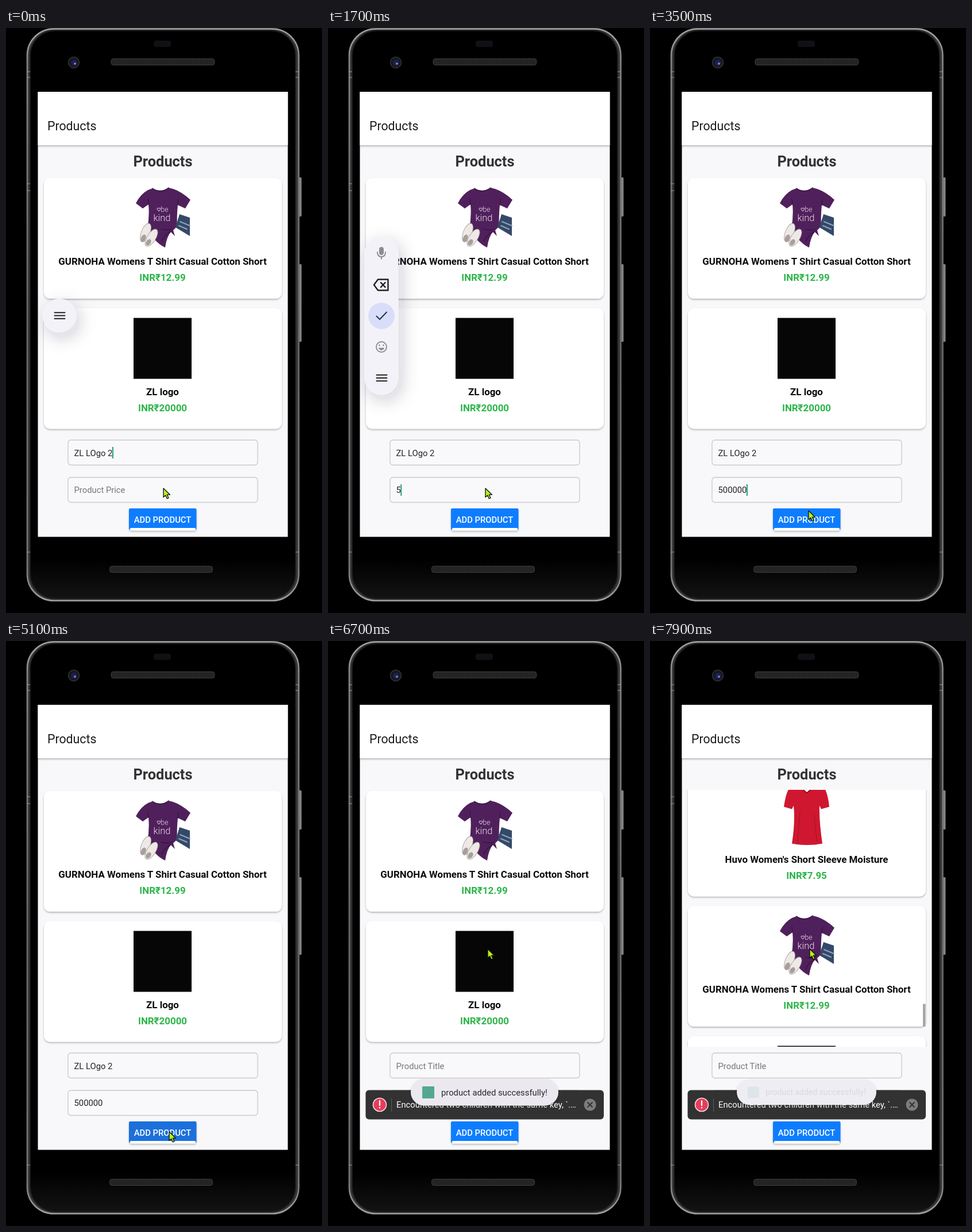
These frames come from a looping animation (550x1018 px, 8000 ms). An HTML page:

```html
<!DOCTYPE html>
<html lang="en">
<head>
<meta charset="utf-8">
<title>Products</title>
<style>
  html, body { margin: 0; width: 100%; height: 100%; overflow: hidden; background: #000; }
  svg { display: block; width: 100%; height: 100%; }
  text { font-family: Roboto, sans-serif; font-size: 14.8px; white-space: pre; }
  .mid { text-anchor: middle; }
  .name { font-size: 16.92px; font-weight: 700; fill: #0b0b0b; }
  .price { font-size: 16.92px; font-weight: 700; fill: #2db54a; }
  .line { fill: none; stroke-linecap: round; stroke-linejoin: round; }
</style>
</head>
<body>
<svg viewBox="0 0 550 1018">
  <defs>
    <linearGradient id="rim" x2="0" y2="1">
      <stop offset="0" stop-color="#a5a5a5"/><stop offset=".06" stop-color="#858585"/>
      <stop offset=".5" stop-color="#686868"/><stop offset=".94" stop-color="#777"/>
      <stop offset="1" stop-color="#a0a0a0"/>
    </linearGradient>
    <linearGradient id="key">
      <stop offset="0" stop-color="#444"/><stop offset=".6" stop-color="#8c8c8c"/><stop offset="1" stop-color="#777"/>
    </linearGradient>
    <linearGradient id="chin" x2="0" y2="1">
      <stop offset=".93" stop-color="#000"/><stop offset="1" stop-color="#131313"/>
    </linearGradient>
    <pattern id="mesh" width="3" height="3" patternUnits="userSpaceOnUse">
      <rect width="3" height="3" fill="#1c1c1c"/><rect width="1.5" height="3" fill="#2b2b2b"/>
    </pattern>
    <filter id="soft" x="-10%" y="-10%" width="120%" height="130%">
      <feDropShadow dx="0" dy="1.8" stdDeviation="1.6" flood-opacity=".28"/>
    </filter>
    <filter id="float" x="-120%" y="-80%" width="360%" height="280%">
      <feDropShadow dx="5" dy="9" stdDeviation="15" flood-color="#223" flood-opacity=".22"/>
    </filter>
    <clipPath id="listClip"><rect x="56" y="259" width="434" height="447"/></clipPath>
    <clipPath id="screenClip"><rect x="55.500" y="111" width="435" height="774.500"/></clipPath>

    <g id="purpleTee">
      <path d="M255 18Q269 26 283 17L291 19Q306 24 321 38L312 53L299 47Q297 69 298 84L291 91L294 101L287 94Q280 101 277 121Q266 116 257 105L246 88Q250 66 248 46L238 53L226 44Q234 28 247 21Z" fill="#50205c"/>
      <path d="M255 18Q269 28 283 17M248 46L247 36M299 47L300 37M289 89Q280 92 270 89M287 93Q275 100 271 110" class="line" stroke="#34123e" stroke-width="1.3"/>
      <path d="M302 63L320 69V101L295 86Z" fill="#34496a"/>
      <path d="M303 76L320 83M301 83L315 89" class="line" stroke="#92a2b8" stroke-width="2"/>
      <g fill="#eee9e6" stroke="#a9a19e" stroke-width=".9">
        <ellipse cx="243" cy="95" rx="7.500" ry="17" transform="rotate(22 243 95)"/>
        <ellipse cx="253" cy="104" rx="7.500" ry="17" transform="rotate(32 253 104)"/>
      </g>
      <ellipse cx="239" cy="105" rx="4" ry="7" transform="rotate(25 239 105)" fill="#a89e9a"/>
      <ellipse cx="248" cy="112" rx="4" ry="6" transform="rotate(32 248 112)" fill="#a89e9a"/>
      <g fill="#e8dcea" class="mid">
        <path d="M266 58l-3-4q0-3 3-1q3-2 3 1Z" fill="none" stroke="#e8dcea"/>
        <text x="276" y="59" style="font-size:12px;font-weight:300">be</text>
        <text x="271.500" y="75" style="font-size:16.500px;font-weight:300">kind</text>
      </g>
    </g>
    <g id="redTee">
      <path d="M257 16L273 29L289 16L304 22Q310 33 312 54L298 58L295 52Q294 77 300 118Q274 123 247 118Q253 80 250 52L247 58L233 54Q236 32 242 22Z" fill="#cf1730"/>
      <path d="M257 16L273 30L289 16" class="line" stroke="#98091f" stroke-width="2"/>
      <path d="M261 63Q258 92 257 116M286 68Q288 95 291 115" class="line" stroke="#af1027" stroke-width="1.2"/>
    </g>
    <g id="square"><rect x="222" y="17" width="101" height="106" fill="#060606"/></g>
    <g id="burger" class="line" stroke="#222" stroke-width="2"><path d="M-9-5.200H9M-9 0H9M-9 5.200H9"/></g>
  </defs>

  <rect width="550" height="1018"/>
  <g id="phone">
    <rect x="508" y="260" width="6.500" height="68" rx="1.500" fill="url(#key)"/>
    <rect x="508" y="411" width="6.500" height="135" rx="1.500" fill="url(#key)"/>
    <rect x="37" y="1.500" width="472.500" height="995" rx="46" fill="#383838" stroke="url(#rim)" stroke-width="2.600"/>
    <rect x="42" y="4.500" width="462" height="988.500" rx="43" fill="url(#chin)" stroke="#1d1d1d" stroke-width="2"/>
    <path d="M36 76h6M36 86h6M36 271h6M36 283h6M504 76h6M504 86h6M36 912h6M504 912h6" stroke="#999"/>
    <rect x="257" y="22" width="30" height="11" rx="4" fill="#111015"/>
    <rect x="183" y="53.500" width="180" height="11" rx="4" fill="url(#mesh)" stroke="#3d3d3d"/>
    <rect x="180.500" y="936.500" width="179" height="11" rx="4" fill="url(#mesh)" stroke="#3d3d3d"/>
    <circle cx="118" cy="60" r="9.500" fill="#17171a" stroke="#343438" stroke-width="1.500"/>
    <circle cx="118.500" cy="60.500" r="5.500" fill="#1c2052"/>
    <circle cx="120" cy="62" r="1.800" fill="#8996df"/>
  </g>

  <g clip-path="url(#screenClip)">
    <rect x="55" y="111" width="436" height="775" fill="#f8f8fb"/>
    <rect x="50" y="105" width="446" height="99" fill="#fff" filter="url(#soft)"/>
    <text x="72" y="178" style="font-size:21.300px" fill="#1c1c1e">Products</text>
    <text x="273" y="241" class="mid" style="font-size:25.400px;font-weight:700" fill="#333">Products</text>

    <g clip-path="url(#listClip)">
      <g id="list"></g>
      <rect id="thumb" x="475" width="4.500" height="39.500" fill="#a5a5a8"/>
    </g>

    <g fill="#f9f9fb" stroke="#cacacc" stroke-width="1.300">
      <rect x="108" y="717" width="330" height="43.500" rx="5"/>
      <rect x="108" y="782" width="330" height="43.500" rx="5"/>
    </g>
    <text id="title" x="118.500" y="744.500"></text>
    <text id="cost" x="118.500" y="809"></text>
    <rect id="caret" width="2" height="20" fill="#2b9d78"/>

    <g filter="url(#soft)">
      <rect id="button" x="214" y="836" width="117.500" height="37" rx="2"/>
      <rect x="216" y="870" width="114" height="4.500" rx="1.500" fill="#fff"/>
    </g>
    <text x="272.500" y="861" class="mid" fill="#fff" style="font-weight:500">ADD PRODUCT</text>

    <g id="warning">
      <rect x="65.500" y="781.500" width="414.500" height="51" rx="6" fill="#323232"/>
      <circle cx="90" cy="807" r="11.500" fill="#e63d5c" stroke="#f4dfe3" stroke-width="1.600"/>
      <path d="M90 800.500v7.500M90 812v.4" class="line" stroke="#fff" stroke-width="2.300"/>
      <path d="M110.500 796v23" stroke="#5c5c5c"/>
      <text x="119" y="812" fill="#fff">Encountered two children with the same key, `.…</text>
      <circle cx="456" cy="807" r="10.500" fill="#7d7d7d"/>
      <path d="M452 803l8 8M460 803l-8 8" class="line" stroke="#303030" stroke-width="1.800"/>
    </g>

    <g id="toast">
      <rect id="toastBox" x="144" y="761.500" width="257" height="47" rx="23.500" filter="url(#soft)"/>
      <g id="toastBody">
        <rect x="164" y="775" width="21" height="21" rx="1" fill="#54a892"/>
        <text x="197" y="790.500" fill="#29292d">product added successfully!</text>
      </g>
    </g>

    <g id="bar">
      <rect id="barBox" x="63.500" width="59" rx="29.500" fill="#f4f2f9" filter="url(#float)"/>
      <g id="tools">
        <g stroke="#8d8c92" class="line" stroke-width="1.900">
          <rect x="90" y="382" width="6" height="12" rx="3" fill="#8d8c92"/>
          <path d="M86 390q0 8 7 8t7-8M93 398v4"/>
          <circle cx="93" cy="555" r="9"/>
          <path d="M89 557.500q4 5 8 0Z" fill="#8d8c92"/>
          <path d="M89.500 552v.3M96.500 552v.3" stroke-width="2.600"/>
        </g>
        <path d="M87 437.500H104.500V456.500H87L80 447ZM92 443l7.500 8M99.500 443l-7.500 8" class="line" stroke="#202024" stroke-width="2.400"/>
        <circle cx="93" cy="501" r="23" fill="#d8def9"/>
        <path d="M84.500 501.500l5.500 5.500L102 494.500" class="line" stroke="#2c3452" stroke-width="2.100"/>
      </g>
      <use id="menu" href="#burger"/>
    </g>
  </g>
  <path id="mouse" d="M0 0V15.500L3.600 12.300L6.300 18L9 16.800L6.400 11.200H11.500Z" fill="#b9f216" stroke="#111" stroke-width="1.300" stroke-linejoin="round"/>
</svg>
<script>
const LOOP = 8000, STEP = 100, PITCH = 226.5;
const $ = id => document.getElementById(id);
const set = (id, attrs) => { for (const k in attrs) $(id).setAttribute(k, attrs[k]); };
const show = (id, on) => set(id, { visibility: on ? 'visible' : 'hidden' });
const mix = (a, b, p) => a + (b - a) * p;
const ramp = (t, a, b) => Math.min(1, Math.max(0, (t - a) / (b - a)));
const ease = (t, a, b) => { const p = ramp(t, a, b); return p * p * (3 - 2 * p); };

const products = [
  ['redTee', "Huvo Women's Short Sleeve Moisture", '7.95'],
  ['purpleTee', 'GURNOHA Womens T Shirt Casual Cotton Short', '12.99'],
  ['square', 'ZL logo', '20000'],
  ['square', 'ZL LOgo 2', '500000']
];
$('list').innerHTML = products.map(([art, name, price], i) => `
  <g id="card${i}" transform="translate(0 ${261 + (i - 1) * PITCH})">
    <rect x="66" width="414" height="210" rx="11" fill="#fff" filter="url(#soft)"/>
    <use href="#${art}"/>
    <text x="272.500" y="151" class="mid name">${name}</text>
    <text x="272.500" y="179" class="mid price">INR₹${price}</text>
  </g>`).join('');

const keys = [1600, 1850, 2000, 2100, 2300, 2400];
const FOCUS = 900, CLEAR = 5600, WARN = 6500;
const path = [[0, 274, 801], [2900, 274, 801], [3300, 276, 840], [4000, 276, 840],
  [4300, 284, 854], [6200, 284, 854], [6700, 278, 536]];

function field(id, value, hint) {
  $(id).textContent = value || hint;
  set(id, { fill: value ? '#222' : '#77777a' });
  return value ? $(id).getComputedTextLength() : 0;
}

function drawForm(t) {
  const typed = t < CLEAR ? '500000'.slice(0, keys.filter(k => t >= k).length) : '';
  const w1 = field('title', t < CLEAR ? 'ZL LOgo 2' : '', 'Product Title');
  const w2 = field('cost', typed, 'Product Price');
  const inCost = t >= FOCUS;
  const since = t - Math.max(-100, ...[FOCUS, ...keys, CLEAR].filter(k => t >= k));
  set('caret', { x: 118 + (inCost ? w2 : w1), y: inCost ? 794 : 729 });
  show('caret', since % 1000 < 500);

  const press = ease(t, 4400, 4700) - ease(t, 5200, 5500);
  set('button', { fill: `rgb(${mix(10, 29, press)},${mix(125, 111, press)},${mix(255, 219, press)})` });
  show('warning', t >= WARN);
}

function drawBar(t) {
  const open = ease(t, 950, 1300) - ease(t, 1900, 2200);
  const half = mix(29.5, 138, open);
  set('barBox', { y: 500.5 - half, height: half * 2 });
  set('menu', { transform: `translate(93.500 ${500.5 + half - 29.5})` });
  set('tools', { opacity: ramp(open, 0.5, 1) });
  set('bar', { opacity: 1 - ramp(t, 2700, 2900) });
}

function drawToast(t) {
  const enter = ease(t, 5500, 5750), leave = ramp(t, 7750, 7900);
  const k = mix(0.94, 1, enter) - 0.055 * leave;
  set('toast', { opacity: enter, transform: `translate(272.500 785) scale(${k}) translate(-272.500 -785)` });
  set('toastBox', { fill: leave > 0 ? '#efedf4' : '#ebe9ef' });
  set('toastBody', { opacity: 1 - 0.9 * leave });
}

function drawList(t) {
  const down = ease(t, 6800, 7200), up = ease(t, 7500, 7900);
  const pull = ease(t, 7150, 7400) - ease(t, 7500, 7650);
  const shift = -PITCH * down + 426.5 * up - 2.5 * pull;
  set('list', { transform: `translate(0 706) scale(1 ${1 + 0.03 * pull}) translate(0 ${shift - 706})` });
  show('card3', t >= 6400);
  set('thumb', { y: 647 + 19 * down - 34.5 * up, opacity: ramp(t, 6750, 6850) });
}

function drawMouse(t) {
  let i = path.length - 1;
  while (path[i][0] > t) i--;
  const a = path[i], b = path[i + 1] || a;
  const p = a === b ? 0 : ease(t, a[0], b[0]);
  set('mouse', { transform: `translate(${mix(a[1], b[1], p)} ${mix(a[2], b[2], p)})` });
}

function draw(ms) {
  const t = Math.floor(ms % LOOP / STEP) * STEP;
  for (const part of [drawForm, drawBar, drawToast, drawList, drawMouse]) part(t);
}

const start = performance.now();
function tick() {
  draw(performance.now() - start);
  requestAnimationFrame(tick);
}
tick();
</script>
</body>
</html>
```
